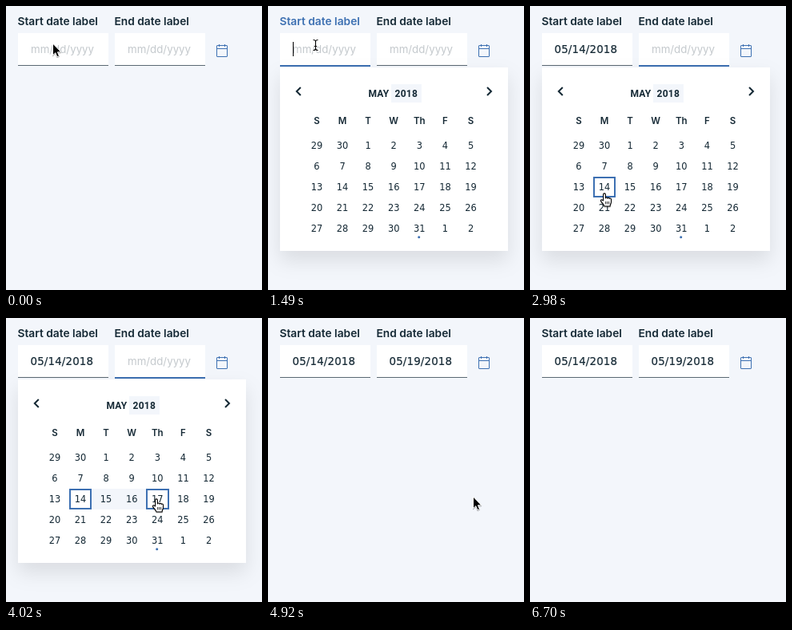
Recreate the animation shown at these times as an HTML page. Size 320 by 356 pixels, loop 6800 ms.

```html
<!DOCTYPE html>
<html lang="en">
<head>
<meta charset="utf-8">
<title>Date range picker</title>
<style>
  html, body { margin: 0; width: 100%; height: 100%; overflow: hidden; background: #f3f6fb; }
  svg { display: block; width: 320px; height: 356px; }
  text { fill: #152935; font-family: Inter, sans-serif; }
  .label { font-size: 13.75px; font-weight: 600; }
  .hint { font-size: 13.3px; fill: #c4c9cd; }
  .value { font: 13.4px "DejaVu Sans", sans-serif; letter-spacing: .15px; stroke: #152935; stroke-width: .2; }
  .month { font: 700 12px Roboto, sans-serif; letter-spacing: .25px; }
  .head { font-size: 11.5px; font-weight: 600; text-anchor: middle; }
  .day { font: 11.4px "DejaVu Sans", sans-serif; text-anchor: middle; }
  .field { fill: #fff; }
  .line { fill: #5a6872; }
  .blue { fill: #3d70b2; }
  .soft { fill: #f3f6fb; }
  .hover { fill: #ebf3fc; }
  .ring { fill: none; stroke: #3d70b2; stroke-width: 2; }
  .icon { fill: none; stroke: #3d70b2; }
  .chevron { fill: none; stroke: #152935; stroke-width: 2; }
  .sheet { fill: #fff; filter: drop-shadow(0 12px 12px rgba(0, 0, 0, .1)); }

  .anim { animation: 6.8s step-end infinite; }
  #startLabel { animation-name: startLabel; }
  #startFocus { animation-name: startFocus; }
  #startHint { animation-name: startHint; }
  #startValue, #picked { animation-name: startValue; }
  #endFocus { animation-name: endFocus; }
  #endHint { animation-name: endHint; }
  #endValue { animation-name: endValue; }
  #caret { animation-name: caret; }
  #panel { animation-name: panel; }
  #hover { animation-name: hover; }
  #range { animation-name: range; }
  #target { animation-name: target; }
  #cursor { animation-name: cursor; }
  #arrow { animation-name: arrow; filter: drop-shadow(0 1px .7px rgba(0, 0, 0, .35)); }
  #beam { animation-name: beam; }
  #hand { animation-name: hand; filter: drop-shadow(0 1px .7px rgba(0, 0, 0, .3)); }

  @keyframes startLabel { 0%, 43.82% { fill: #152935 } 8.67% { fill: #3d70b2 } }
  @keyframes startFocus { 0%, 43.82% { opacity: 0 } 8.67% { opacity: 1 } }
  @keyframes startHint { 0% { opacity: 1 } 43.82% { opacity: 0 } }
  @keyframes startValue { 0% { opacity: 0 } 43.82% { opacity: 1 } }
  @keyframes endFocus { 0%, 72.35% { opacity: 0 } 43.82% { opacity: 1 } }
  @keyframes endHint { 0% { opacity: 1 } 72.35% { opacity: 0 } }
  @keyframes endValue { 0% { opacity: 0 } 72.35% { opacity: 1 } }
  @keyframes caret {
    0%, 15.29%, 28.52%, 43.82% { opacity: 0 }
    8.67%, 21.91%, 37.2% { opacity: 1 }
  }
  @keyframes panel {
    0%, 72.35% { opacity: 0; transform: translateY(-1px) }
    8.67% { opacity: 1; transform: translateY(-1px) }
    10.88% { opacity: 1; transform: none }
  }
  @keyframes hover {
    0%, 43.82% { opacity: 0; transform: none }
    32.94% { opacity: 1; transform: none }
    35% { opacity: 1; transform: translateY(26px) }
  }
  @keyframes range {
    0% { width: 0 }
    56.91% { width: 36px }
    59.11% { width: 68px }
    61.32% { width: 100px }
    63.52% { width: 132px }
  }
  @keyframes target {
    0% { opacity: 0; transform: none }
    56.91% { opacity: 1; transform: none }
    59.11% { opacity: 1; transform: translateX(32px) }
    61.32% { opacity: 1; transform: translateX(64px) }
    63.52% { opacity: 1; transform: translateX(96px) }
  }
  @keyframes cursor {
    0% { transform: translate(57px, 47px) }
    6.47% { transform: translate(55px, 41px) }
    28.52% { transform: translate(55px, 61px) }
    30.73% { transform: translate(69px, 147px) }
    32.94% { transform: translate(83px, 197px) }
    35% { transform: translate(85px, 228px) }
    37.2% { transform: translate(87px, 234px) }
    54.7% { transform: translate(112px, 234px) }
    56.91% { transform: translate(148px, 229px) }
    59.11% { transform: translate(182px, 226px) }
    61.32% { transform: translate(225px, 227px) }
    63.52% { transform: translate(246px, 225px) }
    65.73% { transform: translate(252px, 225px) }
    72.35% { transform: translate(255px, 224px) }
    90% { transform: translate(258px, 243px) }
    92.2% { transform: translate(269px, 288px) }
    94.26% { transform: translate(283px, 336px) }
    96.47% { transform: translate(289px, 355px) }
    98.52% { transform: translate(289px, 362px) }
  }
  @keyframes arrow { 0%, 30.73%, 72.35% { opacity: 1 } 6.47%, 32.94% { opacity: 0 } }
  @keyframes beam { 0%, 30.73% { opacity: 0 } 6.47% { opacity: 1 } }
  @keyframes hand { 0%, 72.35% { opacity: 0 } 32.94% { opacity: 1 } }
</style>
</head>
<body>
<svg viewBox="0 0 320 356">
  <defs>
    <path id="beamShape" d="M1.5 1.5q3 0 3 2v9q0 2-3 2M7.5 1.5q-3 0-3 2M4.5 12.5q0 2 3 2M2.8 9.5h3.4"/>
  </defs>

  <text id="startLabel" class="label anim" x="14.5" y="24">Start date label</text>
  <rect class="field" x="15" y="34" width="113" height="40"/>
  <rect class="line" x="15" y="74" width="113" height="1"/>
  <rect id="startFocus" class="blue anim" x="15" y="74" width="113" height="2"/>
  <text id="startHint" class="hint anim" x="31" y="59">mm/dd/yyyy</text>
  <text id="startValue" class="value anim" x="30.5" y="59">05/14/2018</text>
  <rect id="caret" class="anim" x="31" y="45" width="1" height="18"/>

  <text class="label" x="135.5" y="24">End date label</text>
  <rect class="field" x="136" y="34" width="113" height="40"/>
  <rect class="line" x="136" y="74" width="113" height="1"/>
  <rect id="endFocus" class="blue anim" x="136" y="74" width="113" height="2"/>
  <text id="endHint" class="hint anim" x="152" y="59">mm/dd/yyyy</text>
  <text id="endValue" class="value anim" x="151.5" y="59">05/19/2018</text>

  <g class="icon">
    <rect x="263.5" y="49.5" width="13" height="14" rx=".5"/>
    <path d="M263.5 53.5h13M266.5 48v3M273.5 48v3"/>
  </g>

  <g id="panel" class="anim">
    <rect class="sheet" x="15" y="77" width="285" height="230"/>
    <path class="chevron" d="M40.8 102l-5 5 5 5M274 102l5 5-5 5"/>
    <rect class="soft" x="154" y="98" width="38" height="23"/>
    <text class="month" x="125.5" y="113.6">MAY</text>
    <text class="month" x="158.5" y="113.6">2018</text>
    <rect id="hover" class="hover anim" x="79" y="188" width="28" height="26"/>
    <rect id="range" class="soft anim" x="107" y="214" width="0" height="26"/>
    <rect id="picked" class="ring anim" x="80" y="215" width="26" height="24"/>
    <rect id="target" class="ring anim" x="144" y="215" width="27" height="24"/>
    <g id="grid"></g>
    <circle class="blue" cx="188.7" cy="289.8" r="1.5"/>
  </g>

  <g id="cursor" class="anim">
    <path id="arrow" class="anim" stroke="#fff" d="M1.5 0V14.8l3.3-3.1 2.1 5 2.6-1.1-2.1-4.8h4.5z"/>
    <g id="beam" class="anim" fill="none">
      <use href="#beamShape" stroke="#fff" stroke-width="2.4"/>
      <use href="#beamShape" stroke="#000" stroke-width="1.1"/>
    </g>
    <g id="hand" class="anim" stroke="#000" stroke-width="1.1" stroke-linejoin="round">
      <path fill="#fff" d="M4.6 10V2.3a1.4 1.4 0 0 1 2.8 0V7q.2-1 1.3-1 1.2 0 1.3 1.2.2-.8 1.2-.8 1.1 0 1.2 1.1.2-.5 1-.5 1.1 0 1.1 1.4v3c0 2-1.3 2.8-1.4 5.6H6c-.3-2-2.8-4-4.4-6.4-.8-1.5.9-2.2 1.9-1.4z"/>
      <path fill="none" stroke-width=".8" d="M7.6 11v3.4M9.6 11v3.4M11.6 11v3.4"/>
    </g>
  </g>
</svg>
<script>
  const grid = document.getElementById('grid');

  function addText(kind, col, y, label) {
    const el = document.createElementNS('http://www.w3.org/2000/svg', 'text');
    el.setAttribute('class', kind);
    el.setAttribute('x', 60.9 + 32.1 * col);
    el.setAttribute('y', y);
    el.textContent = label;
    grid.append(el);
  }

  ['S', 'M', 'T', 'W', 'Th', 'F', 'S'].forEach((name, col) => addText('head', col, 148, name));
  for (let i = 0; i < 35; i++) {
    const day = new Date(2018, 3, 29 + i).getDate();
    addText('day', i % 7, 179.2 + 26 * Math.floor(i / 7), day);
  }
</script>
</body>
</html>
```
